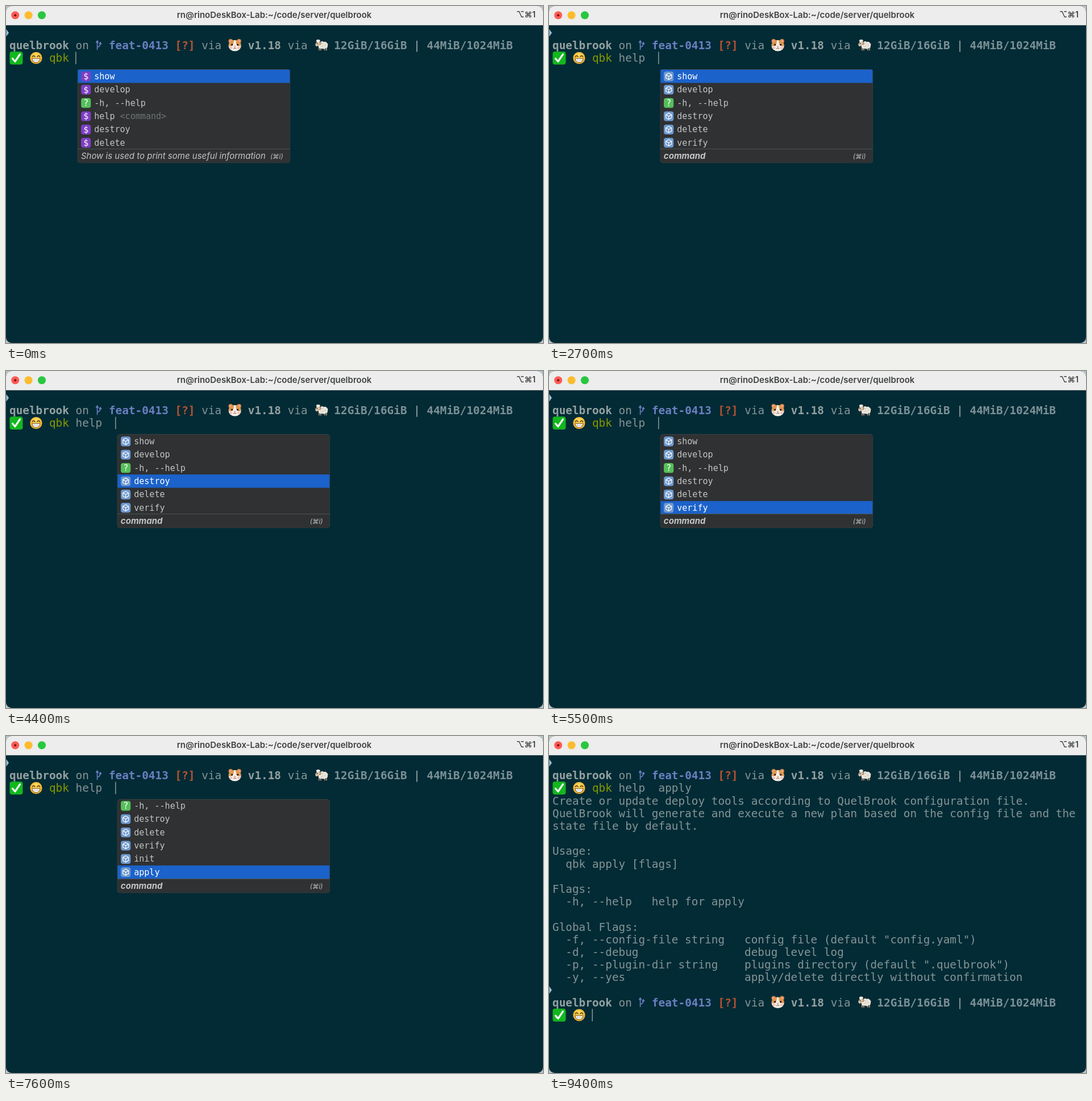
An HTML page that plays this animation: 945x593 px, repeating every 9500 ms.

```html
<!DOCTYPE html>
<html lang="en">
<head>
<meta charset="utf-8">
<title>Terminal completion</title>
<style>
html, body { margin: 0; width: 100%; height: 100%; overflow: hidden; background: #032b35; }
svg { display: block; }
text { white-space: pre; }
.term { font: 19.37px "DejaVu Sans Mono", monospace; fill: #839496; }
.b { font-weight: bold; }
.item { font: 15.07px "DejaVu Sans Mono", monospace; }
.ui { font-family: Inter, "DejaVu Sans", sans-serif; }
</style>
</head>
<body>
<svg id="stage" width="945" height="593" viewBox="0 0 945 593"></svg>
<script>
const LOOP = 9500, CELL = 11.66, LINE = 22.2, ROW = 23.36;
const col = c => 6 + c * CELL;
const mid = r => 69.3 + r * LINE;
const esc = s => s.replace(/&/g, '&amp;').replace(/</g, '&lt;');

const APP = 'qbk', PROJECT = 'quelbrook';
const HOME = `rn@rinoDeskBox-Lab:~/code/server/${PROJECT}`;
const OUTPUT = [
  'Create or update deploy tools according to QuelBrook configuration file.',
  'QuelBrook will generate and execute a new plan based on the config file and the',
  'state file by default.',
  '',
  'Usage:',
  `  ${APP} apply [flags]`,
  '',
  'Flags:',
  '  -h, --help   help for apply',
  '',
  'Global Flags:',
  '  -f, --config-file string   config file (default "config.yaml")',
  '  -d, --debug                debug level log',
  `  -p, --plugin-dir string    plugins directory (default ".${PROJECT}")`,
  '  -y, --yes                  apply/delete directly without confirmation'
];

const word = (c, r, s, fill = '#839496', bold = false) =>
  `<text class="term${bold ? ' b' : ''}" x="${col(c)}" y="${mid(r) + 6.8}" style="fill:${fill}">${esc(s)}</text>`;
const at = (x, y, body) => `<g transform="translate(${x} ${y})">${body}</g>`;
const caret = (c, r) =>
  `<rect x="${col(c) - 0.4}" y="${mid(r) - 10.8}" width="1.4" height="21.6" fill="#93a1a1"/>`;

// Emoji are drawn around their own centre
const CHECK = `<rect x="-11.5" y="-11.3" width="23" height="22.8" rx="4" fill="#12b71e"/>
  <path d="M-6.5 1L-2 6.2L6.5-6.5" fill="none" stroke="#fff" stroke-width="3.2" stroke-linecap="round" stroke-linejoin="round"/>`;
const GRIN = `<circle r="10.6" fill="url(#face)"/>
  <path d="M-6.6-2.2Q-4.2-6-1.8-2.2M1.8-2.2Q4.2-6 6.6-2.2" fill="none" stroke="#5b3a12" stroke-width="1.5" stroke-linecap="round"/>
  <path d="M-7 .8H7Q6.4 8 0 8T-7 .8Z" fill="#fff" stroke="#74501f" stroke-width="1"/>
  <path d="M-6.4 4H6.4M-3 1V7M0 1V8M3 1V7" stroke="#b9b1a4" stroke-width=".6"/>`;
const HAMSTER = `<circle cx="-7.4" cy="-7" r="3.8" fill="#d98b45"/><circle cx="7.4" cy="-7" r="3.8" fill="#d98b45"/>
  <circle cx="-7.4" cy="-6.8" r="2" fill="#f3a9a4"/><circle cx="7.4" cy="-6.8" r="2" fill="#f3a9a4"/>
  <ellipse cy="1" rx="11" ry="9.8" fill="#f4eee5"/>
  <path d="M-10.6 2Q-11-8-1.6-9Q-1.4-1-6 2ZM10.6 2Q11-8 1.6-9Q1.4-1 6 2Z" fill="#e0964d"/>
  <circle cx="-5" cy="-.6" r="1.7" fill="#2b1a14"/><circle cx="5" cy="-.6" r="1.7" fill="#2b1a14"/>
  <ellipse cx="-6.8" cy="5" rx="2.6" ry="1.8" fill="#f6b8ae"/><ellipse cx="6.8" cy="5" rx="2.6" ry="1.8" fill="#f6b8ae"/>
  <path d="M-1.8 2H1.8L0 4Z" fill="#e0706d"/><path d="M-2.6 6Q-1 7 0 4.6Q1 7 2.6 6" fill="none" stroke="#7c4a35"/>`;
const SHEEP = `<path d="M-4 4V9.5M-1 5V9.5M6 5V9.5M9 3V9.5" stroke="#a58a72" stroke-width="1.9"/>
  <path d="M-6-3Q-5-6-2-5Q1-8 4-5.5Q8-7 9.5-4Q12.5-2 11 1Q11.5 5 8 5.5Q4 8 1 6Q-3 7.5-5 4Z" fill="#e9e4da"/>
  <path d="M0-2q2-2 3 0M5 1q2-2 3 0M0 3q2-2 3 0" fill="none" stroke="#c5bdb0"/>
  <path d="M-10.6-1.6L-7-7.5L-3-5L-4.4 0L-8 2.6Q-11 2.4-10.6-1.6Z" fill="#d6c1a6"/>
  <ellipse cx="-5.6" cy="-7.4" rx="3.4" ry="2.3" fill="#f1ede5"/>
  <path d="M-3.4-5Q-.6-4.8-1.6-2Q-2.6-.4-4-1.6" fill="none" stroke="#a5835c" stroke-width="1.7"/>
  <circle cx="-7.5" cy="-2.8" r=".9" fill="#33261e"/>`;

function prompt(r) {
  const y = mid(r), violet = '#6a7fc1', dim = '#7b9196';
  return `<path d="M.5 ${y - 28.5}L5 ${y - 22}L.5 ${y - 15.5}Z" fill="#9cc0dc"/>` +
    word(0, r, PROJECT, '#93a1a1', true) + word(10, r, 'on') +
    at(col(13), y, `<path d="M3-7V8M3 3Q8.5 2 8.5-4M.8-4.5L3-8L5.2-4.5M6.4-2L8.5-5L10.4-2" fill="none" stroke="${violet}" stroke-width="1.6"/>`) +
    word(15, r, 'feat-0413', violet, true) + word(25, r, '[?]', '#b9532f', true) +
    word(29, r, 'via') + at(402.7, y - 0.6, HAMSTER) + word(36, r, 'v1.18', '#93a1a1', true) +
    word(42, r, 'via') + at(555, y - 0.6, SHEEP) +
    word(49, r, '12GiB/16GiB | 44MiB/1024MiB', dim, true) +
    at(18, y + LINE, CHECK) + at(53, y + LINE, GRIN);
}

const badge = fill => `<rect x="-8.6" y="-8.6" width="17.2" height="17.2" rx="4" fill="${fill}"/>`;
const glyph = s => `<text class="item" y="5.4" text-anchor="middle" fill="#fff">${s}</text>`;
const ICONS = {
  cmd: badge('#7d3fc4') + glyph('$'),
  flag: badge('#55bf5b') + glyph('?'),
  arg: badge('#6d98cf') +
    '<path d="M0-5.6L5-2.8V2.8L0 5.6L-5 2.8V-2.8ZM-5-2.8L0 0L5-2.8M0 0V5.6" fill="none" stroke="#fff" stroke-width="1.2" stroke-linejoin="round"/>'
};

const item = (kind, name, hint = '') => ({ kind, name, hint });
const FLAG = item('flag', '-h, --help');
const HELP = item('cmd', 'help', '<command>');
const MENU = [item('cmd', 'show'), item('cmd', 'develop'), FLAG, HELP,
  item('cmd', 'destroy'), item('cmd', 'delete')];
const ARGS = ['show', 'develop', FLAG, 'destroy', 'delete', 'verify', 'init', 'apply']
  .map(a => a.name ? a : item('arg', a));

function popup(c, items, sel, note, bold, match = 0) {
  const x = col(c) + 2.8, w = 375, n = Math.min(6, items.length);
  const listH = n * ROW + 1, h = listH + 24.4;
  const scroll = sel < n ? 0 : (sel - n + 1) * ROW + 1;
  const rows = items.map((it, i) => {
    const y = 1 + i * ROW - scroll, on = i === sel;
    return (on ? `<rect x="1" y="${y}" width="${w - 2}" height="${ROW}" fill="#1b62ca"/>` : '') +
      at(15.3, y + 11.9, ICONS[it.kind]) +
      (match ? `<rect x="29.8" y="${y + 2.5}" width="${9.07 * match}" height="18.5" fill="#7fa6dc"/>` : '') +
      `<text class="item" x="29.8" y="${y + 17}" fill="${on ? '#fff' : '#c3c5c5'}">${it.name}` +
      (it.hint ? `<tspan fill="${on ? '#b1c9ee' : '#717576'}"> ${esc(it.hint)}</tspan>` : '') + '</text>';
  }).join('');
  return `<svg x="${x}" y="111" width="${w}" height="${h}">
    <rect x=".5" y=".5" width="${w - 1}" height="${h - 1}" rx="5" fill="#2f3132" stroke="#3a4041"/>
    <svg width="${w}" height="${listH}">${rows}</svg>
    <path d="M1 ${listH - 0.6}H${w - 1}" stroke="#505455"/>
    <g class="ui" font-style="italic" fill="#c3c5c5">
      <text x="6.5" y="${listH + 17}" font-size="15" font-weight="${bold ? 700 : 400}">${note}</text>
      <text x="${w - 35.5}" y="${listH + 16.5}" font-size="11.5">(⌘i)</text>
    </g></svg>`;
}

const typed = s => word(6, 1, APP, '#859900') + word(10, 1, s);
const choose = i => typed('help') + caret(16, 1) + popup(16, ARGS, i, 'command', true);
const output = typed('help  apply') + OUTPUT.map((s, i) => word(0, i + 2, s)).join('');

// [start ms, title, body]
const SCENES = [
  [0, HOME, typed('') + caret(10, 1) +
    popup(10, MENU, 0, 'Show is used to print some useful information', false)],
  [1300, HOME, typed('h') + `<path d="M${col(10)} 102.2h${CELL}" stroke="#839496"/>` + caret(11, 1) +
    popup(11, [HELP], 0, 'Help about any command', false, 1)],
  [2300, HOME, choose(0)],
  ...[3300, 3800, 4300, 4900, 5500, 6200, 6900].map((t, i) => [t, HOME, choose(i + 1)]),
  [7700, HOME, typed('help  apply') + caret(21, 1)],
  [8100, `${APP} help apply`, output +
    `<rect x="6" y="${mid(17) - 11}" width="11.7" height="22.2" fill="#839496"/>`],
  [9200, HOME, output + prompt(18) + caret(6, 19)]
];

const light = (x, fill) => `<circle cx="${x}" cy="16.3" r="7" fill="${fill}"/>`;
document.getElementById('stage').innerHTML = `
  <defs><radialGradient id="face" cy=".35"><stop offset="0" stop-color="#ffe269"/><stop offset="1" stop-color="#f4b32c"/></radialGradient>
  <clipPath id="win"><rect width="945" height="593" rx="10"/></clipPath></defs>
  <rect width="945" height="593" fill="#b9c4c8"/>
  <g clip-path="url(#win)">
    <rect width="945" height="593" fill="#032b35"/>
    <rect width="945" height="33.5" fill="#ecedec"/><path d="M0 33.5H945" stroke="#c5cccc"/>
    ${light(16.2, '#fc5b55')}<circle cx="16.2" cy="16.3" r="2.1" fill="#7b100c"/>
    ${light(39.6, '#fdbc2f')}${light(63, '#29c740')}
    <g class="ui" font-weight="600" fill="#404242">
      <text id="title" x="472" y="21" font-size="15" text-anchor="middle"></text>
      <text x="932" y="20" font-size="14" text-anchor="end">⌥⌘1</text>
    </g>
    ${prompt(0)}<g id="body"></g>
  </g>`;

const title = document.getElementById('title'), body = document.getElementById('body');
let shown = null;

function render(t) {
  const scene = SCENES.filter(s => s[0] <= t).pop();
  if (scene === shown) return;
  shown = scene;
  title.textContent = scene[1];
  body.innerHTML = scene[2];
}

const start = performance.now();
function tick(now) {
  render(Math.max(0, now - start) % LOOP);
  requestAnimationFrame(tick);
}
render(0);
requestAnimationFrame(tick);
</script>
</body>
</html>
```
